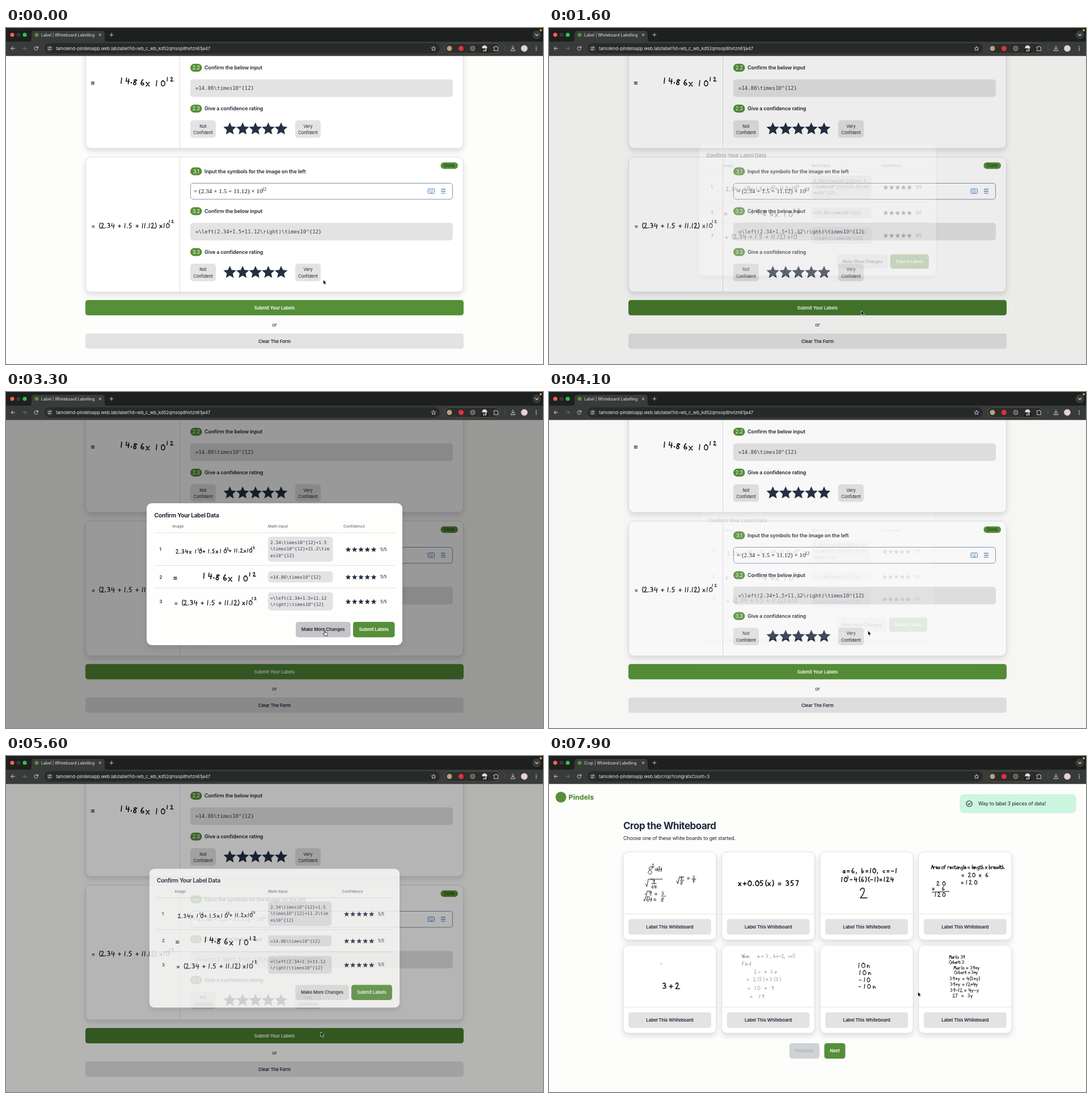
These frames come from a looping animation (947 px wide and 592 px high, 8000 ms). An HTML page:

```html
<!DOCTYPE html>
<html lang="en">
<head>
<meta charset="utf-8">
<title>Whiteboard labelling</title>
<style>
html, body { margin: 0; width: 100%; height: 100%; overflow: hidden; background: #fdfdfb; }
svg { display: block; width: 947px; height: 592px; font-family: Inter, sans-serif; }
text { letter-spacing: -.013em; }
.mono { font-family: "DejaVu Sans Mono", monospace; letter-spacing: 0; }
.math { font-family: "Liberation Serif", serif; letter-spacing: 0; }
.flat { letter-spacing: 0; }
.tight { letter-spacing: -.025em; }
.card { filter: drop-shadow(0 5px 5px rgba(40, 40, 80, .14)); }
.line { fill: none; stroke-linecap: round; stroke-linejoin: round; }
</style>
</head>
<body>
<svg id="stage" viewBox="0 0 947 592" xmlns="http://www.w3.org/2000/svg"></svg>
<script>
const DARK = '#1f2937', GREEN = '#558f38', GREEN_HOVER = '#467a2c', GREY = '#e3e3e4', GREY_HOVER = '#c5c5c8';
const LOOP = 8000, PAGE_SWITCH = 7450;

// ---- drawing helpers ----
const text = (s, x, y, size, { fill = DARK, weight = 400, anchor = 'start', cls = '' } = {}) =>
  `<text x="${x}" y="${y}" font-size="${size}" fill="${fill}" font-weight="${weight}" text-anchor="${anchor}" class="${cls}">${s}</text>`;
const box = (x, y, w, h, r, fill, extra = '') =>
  `<rect x="${x}" y="${y}" width="${w}" height="${h}" rx="${r}" fill="${fill}" ${extra}/>`;
const dot = (x, y, r, fill, extra = '') => `<circle cx="${x}" cy="${y}" r="${r}" fill="${fill}" ${extra}/>`;
const line = (d, color, width = 1, extra = '') =>
  `<path class="line" d="${d}" stroke="${color}" stroke-width="${width}" ${extra}/>`;
const button = (s, x, y, w, h, fill, color, id = '') =>
  box(x, y, w, h, 4.5, fill, id && `id="${id}"`) +
  text(s, x + w / 2, y + h / 2 + 2.8, 7.89, { fill: color, weight: 600, anchor: 'middle' });
const card = (x, y, w, h) => box(x, y, w, h, 9, '#fff', 'class="card" stroke="#dcdde8"');

function star(x, y, R, fill = '#253043') {
  const pts = Array.from({ length: 10 }, (_, i) => {
    const a = i * Math.PI / 5, r = i % 2 ? R * .46 : R;
    return `${(x + r * Math.sin(a)).toFixed(2)},${(y - r * Math.cos(a)).toFixed(2)}`;
  });
  return `<polygon points="${pts.join(' ')}" fill="${fill}"/>`;
}
const stars = (x, y, step, R) => [0, 1, 2, 3, 4].map(i => star(x + i * step, y, R)).join('');

// ---- handwriting: pen strokes in a 6 x 10 cell ----
const digits = {
  0: 'M4 0C-1 1-1 10 3 10S9 2 3 1', 1: 'M1 0L0 10', 2: 'M0 2C1-1 5-1 4 3Q3 7 0 10H7',
  3: 'M0 1C4-2 6 3 2 5C7 4 6 11 0 9', 4: 'M1 0L0 6H6M5 2L4 11', 5: 'M5 0H1L0 4C6 3 6 10 0 10',
  6: 'M4 0C0 3-1 10 3 10S6 5 1 6', 7: 'M0 0H5L2 10', 8: 'M6 1C0-2 0 4 3 5S4 11 1 9 1 5 6 1',
  9: 'M5 1C0-1 0 5 2 5S5 3 5 1L4 10'
};
const marks = {
  '+': 'M0 6H6M3 3V9', '=': 'M0 5H5M0 8H5', '-': 'M0 6H5', '(': 'M3-1Q-1 5 3 11', ')': 'M0-1Q4 5 0 11',
  '.': 'M1 9v1', ',': 'M1 9L0 12', ':': 'M1 5v.5M1 9v.5', '√': 'M0 6L2 10 4 0H11'
};
const letters = {
  a: 'M5 5C0 3 0 10 2 10Q5 9 5 5V10', b: 'M1 0V10C7 10 5 3 1 6', c: 'M5 5C0 4 0 10 5 9',
  d: 'M5 5C0 4 0 10 5 9V0', e: 'M1 7H5C4 3 0 4 1 8Q2 11 5 9', f: 'M5 1Q2-1 2 10M0 4H4',
  g: 'M5 5C0 3 0 10 5 8V11Q3 14 1 12', h: 'M1 0V10Q3 2 5 10', i: 'M2 4V10M2 1v.5', l: 'M2 0V10',
  n: 'M0 4V10Q3 0 5 10', o: 'M3 4C-1 4 0 10 3 10S6 4 3 4', r: 'M1 4V10M1 6Q3 3 5 5',
  s: 'M5 4C-2 5 8 8 0 10', t: 'M2 1V9Q3 11 5 9M0 4H5', x: 'M0 4L5 10M5 4L0 10', y: 'M0 4L2 9M5 4L1 13',
  A: 'M0 10L3 0 6 10M1 6H5', F: 'M5 0H0V10M0 5H4', W: 'M0 0L2 10 3 3 5 10 6 0', M: 'M0 10L1 0 3 6 5 0 6 10'
};
const glyphs = { ...digits, ...marks, ...letters, O: digits[0] };
const advance = c => '.,1():il'.includes(c) ? 4.5 : c === ' ' ? 5 : 8;

// Writes s from x to right, with its top at y and height h.
function ink(s, x, right, y, h, pen = 1, color = '#111') {
  const k = h / 10, chars = [...s];
  const total = chars.slice(0, -1).reduce((n, c) => n + advance(c), 0) || 1;
  const step = (right - x - 5.5 * k) / total;
  let at = x;
  return chars.map(c => {
    const out = glyphs[c] ? `<path class="line" transform="translate(${at.toFixed(2)} ${y}) scale(${k})" d="${glyphs[c]}" stroke="${color}" stroke-width="${pen / k}"/>` : '';
    at += advance(c) * step;
    return out;
  }).join('');
}

const productInk = ink('=', 150.5, 159, 90.5, 10, 1.5) + ink('14', 203, 217, 88, 9.5, 1.6) + ink('.', 220, 222, 87, 10, 2) +
  ink('86', 225, 243, 91, 9.5, 1.7) + ink('x', 247, 257, 91, 11.5, 1.5) +
  ink('10', 265, 279, 92.5, 9.5, 1.5) + ink('12', 284, 294, 87, 6.5, 1.4);
const sumInk = ink('=', 152, 158, 345, 7.5, 1.2) + ink('(2.34 + 1.5 + 11.12)', 164, 268, 344, 8.3, 1.2) +
  ink('x10', 271, 287, 344, 8, 1.2) + ink('12', 288, 295, 338.5, 4.5, 1.1);
const termsInk = ink('2.34x', 300, 327, 277.5, 6.8, 1.1) + ink('10', 334, 344, 277.5, 6.5, 1.1) +
  ink('12', 339, 345, 275, 3.8, 1) + ink('+ 1.5x', 347, 374, 277, 6.8, 1.1) + ink('10', 378, 388, 277, 6.5, 1.1) +
  ink('12', 387, 392, 274, 3.8, 1) + ink('+ 11.2x10', 393, 433, 276, 6.5, 1.1) + ink('12', 433, 438, 272.5, 3.5, 1);

// ---- browser frame ----
function browser() {
  const pale = '#d5d7d6';
  const ring = (x, y) => dot(x, y, 1.1, 'none', `stroke="${pale}" stroke-width=".8"`);
  return box(0, 0, 947, 25, 0, '#1e1f1f') + box(0, 24, 947, 25.3, 0, '#393a3a') +
    dot(11, 12, 3.6, '#fe5f57') + dot(22, 12, 3.6, '#383939') + dot(33, 12, 3.6, '#28c840') +
    `<path d="M41 24Q45 24 45 20V10Q45 5 50 5H169Q174 5 174 10V20Q174 24 178 24Z" fill="#393a3a"/>` +
    dot(54, 12, 3.5, GREEN) + `<text id="tab" x="62" y="14.6" font-size="7" fill="#e6e8e7" class="flat"></text>` +
    line('M164 10L168 14M168 10L164 14', pale, .9) + line('M183 12H189M186 9V15', pale, .9) +
    dot(936, 12, 7.5, '#3a3b3b') + line('M933.5 11L936 13.5 938.5 11', pale, 1.1) + dot(943, 4, 2, '#f09a37') +
    line('M15.5 36H9M12 33L9 36 12 39', pale) + line('M29.5 36H36M33 33L36 36 33 39', '#757777') +
    line('M56 34.5A3.2 3.2 0 1 0 56.2 37M56.5 32.5V35H54', pale) +
    box(68, 27, 697, 18, 9, '#282929') + dot(77, 36, 6, '#393a3a') +
    line('M74 34.2H76.5M79.5 34.2H80M74 37.8H74.5M77.5 37.8H80', pale, .9) + ring(78, 34.2) + ring(76, 37.8) +
    `<text id="url" x="88" y="39" font-size="7.9" fill="#e6e8e7"></text>` +
    `<g stroke="${pale}" stroke-width=".9">${star(754, 36.4, 4, 'none')}</g>` +
    box(774, 27, 97, 18, 9, '#2c2d2b', 'stroke="#55564a"') + dot(782, 36, 4.5, '#b8a27d') + dot(802.5, 36, 4.5, '#e2303c') +
    dot(823, 36, 4, '#565858', 'stroke="#a3a5a5" stroke-width=".9"') + dot(844, 35, 4.5, '#d8dadb') +
    box(839, 36, 11, 7, 1.5, '#111') + text('off', 844.5, 41.7, 5.8, { fill: '#fff', weight: 600, anchor: 'middle' }) +
    line('M860.5 33.5H862.5A1.5 1.5 0 0 1 865.5 33.5H867.5V40H860.5V38A1.4 1.4 0 0 0 860.5 35.5Z', pale) +
    line('M880 32V40', '#555756') + line('M894 31.5V37M891.5 35L894 37.5 896.5 35M890.5 38V40H897.5V38', pale) +
    dot(914, 36, 5.8, '#e3d3d2') + dot(935, 32.8, .9, pale) + dot(935, 36, .9, pale) + dot(935, 39.2, .9, pale);
}

// ---- label page ----
const heading = (num, s, y) => box(325, y - 7, 20.5, 14, 7, GREEN) +
  text(num, 335.3, y + 3.2, 9, { fill: '#fff', anchor: 'middle' }) + text(s, 350, y + 3.3, 9.02, { weight: 600 });
const chip = (top, x, y) => box(x, y, 45, 31, 5, GREY) +
  [top, 'Confident'].map((s, i) => text(s, x + 22.5, y + 13.3 + i * 11.3, 7.6, { anchor: 'middle' })).join('');

const answer = (n, code, dy) => `<g transform="translate(0 ${dy})">` +
  heading(n + '.2', 'Confirm the below input', 70) + box(325, 90.5, 463, 31, 5, GREY) +
  text(code, 334, 109, 9.02, { cls: 'mono', fill: '#303b4b' }) +
  heading(n + '.3', 'Give a confidence rating', 142) + chip('Not', 325, 162.5) + chip('Very', 510, 162.5) +
  stars(394.7, 178, 22.6, 11.8) + '</g>';

function labelPage() {
  const blue = '#3c73b9';
  return card(140.5, 20, 666, 192) + line('M306.5 50V212', '#dcdde6') + productInk +
    answer(2, String.raw`=14.86\times10^{12}`, 0) +
    card(140.5, 227.5, 666, 237.5) + line('M306.5 228V465', '#dcdde6') + sumInk +
    heading('3.1', 'Input the symbols for the image on the left', 252.6) +
    box(766.5, 236.7, 30.5, 11.5, 5.7, GREEN) + text('Done', 781.7, 245.2, 7.7, { anchor: 'middle', fill: '#1c3312' }) +
    box(325.5, 273.5, 462, 28.3, 4.5, '#fff', 'stroke="#8590b0"') +
    text('= (2.34 + 1.5 + 11.12) × 10', 331, 291, 11.2, { cls: 'math', fill: '#111' }) +
    text('12', 451.3, 287, 7.7, { cls: 'math', fill: '#111' }) +
    box(744, 283.5, 11.5, 8, 1, 'none', `stroke="${blue}" stroke-width=".9"`) +
    line('M746 285.8H753.5M746 287.6H753.5', blue, .8, 'stroke-dasharray=".4 1.7"') +
    line('M748 289.6H752', blue, .8) + line('M767.5 284.2H774.5M767.5 287.6H774.5M767.5 291H774.5', blue, 1.2) +
    answer(3, String.raw`=\left(2.34+1.5+11.12\right)\times10^{12}`, 252.7) +
    button('Submit Your Labels', 140, 479.3, 667, 27, GREEN, '#fff', 'send') +
    text('or', 473.5, 525.5, 9.02, { anchor: 'middle' }) +
    button('Clear The Form', 140, 538.3, 667, 27, GREY, DARK);
}

// ---- confirmation dialog ----
function dialog() {
  const rows = [
    { y: 277.2, top: 255, h: 44, code: [String.raw`2.34\times10^{12}+1.5`, String.raw`\times10^{12}+11.2\tim`, 'es10^{12}'], art: termsInk },
    { y: 325.8, top: 316, h: 19.5, code: [String.raw`=14.86\times10^{12}`], art: `<g transform="translate(145.5 231)">${productInk}</g>` },
    { y: 369, top: 353, h: 32, code: [String.raw`=\left(2.34+1.5+11.12`, String.raw`\right)\times10^{12}`], art: `<g transform="translate(146 23)">${sumInk}</g>` }
  ];
  const head = (s, x) => text(s, x, 239.2, 6.76, { weight: 600, fill: '#7a808b', cls: 'flat' });
  return box(248, 196, 451, 250, 9, '#fefefd', 'class="card"') +
    text('Confirm Your Label Data', 261.5, 221, 10.15, { weight: 700, cls: 'tight' }) +
    head('Image', 293.5) + head('Math Input', 462) + head('Confidence', 595) +
    [248, 305.5, 345.5].map(y => line(`M261.5 ${y}H686`, '#e2e2e6')).join('') +
    rows.map((r, i) => text(i + 1, 270.5, r.y + 2.7, 7.89, { weight: 600 }) + r.art +
      box(462, r.top, 114.5, r.h, 5, GREY) +
      r.code.map((s, n) => text(s, 466, r.top + 12.7 + n * 11.6, 7.89, { cls: 'mono', fill: '#374151' })).join('') +
      stars(603.5, r.y + .6, 11.25, 5) + text('5/5', 660, r.y + 2.6, 7.6)).join('') +
    button('Make More Changes', 511, 405, 96.5, 27.3, GREY, DARK, 'change') +
    button('Submit Labels', 612, 405, 73.5, 27.3, GREEN, '#fff', 'confirm');
}

// ---- crop page ----
function boards() {
  const soft = (s, x, r, y) => ink(s, x, r, y, 6.5, .7, '#85838f');
  const small = (s, x, r, y, h = 6) => ink(s, x, r, y, h, .9);
  return small('8', 175, 185, 195, 14) + small('2', 182, 186, 190, 5) + small('=64', 187, 199, 195, 8) +
    small('√', 170, 180, 217, 13) + line('M179 217H200M181 224.5H189', '#111', .9) + small('9', 183, 187, 218) + small('64', 181, 189, 227) +
    small('√', 225, 235, 213, 12) + small('9', 232, 236, 213, 5) + line('M231 219H238M252 217H259', '#111', .9) +
    small('8', 232, 236, 221, 6) + small('=', 244, 249, 211, 7) + small('3', 254, 258, 211, 5) + small('8', 254, 258, 218, 5) +
    small('√9 =', 170, 191, 238, 8) + small('3', 199, 205, 239) + line('M198 247H206', '#111', .8) +
    small('√64 =', 167, 189, 248, 8) + small('8', 198, 203, 250, 7) +
    ink('x+0.05(x) = 357', 334, 440, 219.5, 9, 1.6) +
    ink('a=6, b=10, c=-1', 518, 616, 198, 8, 1.4) + ink('10', 516, 525, 213.5, 8, 1.4) + ink('2', 526, 530, 211, 4, 1) +
    ink('-4(6)(-1)=124', 531, 607, 213.5, 7.5, 1.4) + ink('2', 549, 561, 233, 17, 1.5) +
    ink('Area of rectangle = length x breadth', 674, 803, 192, 7, 1.1) + ink('= 20 x 6', 728, 774, 206, 7, 1.1) +
    ink('=120', 727, 754, 219, 7, 1.1) + ink('20', 684, 698, 221, 7, 1.1) + ink('x  6', 676, 697, 230, 6.5, 1.1) +
    line('M675.5 240L705.5 238.5', '#111') + ink('120', 681, 698, 240.5, 7, 1.1) +
    dot(198, 366, .8, '#333') + ink('3+2', 201, 229, 400, 10, 1.6) +
    soft('When', 340, 354, 349) + soft('a = 3 , b=-2, c=5', 367, 434, 349) + soft('Find', 341, 356, 362.5) +
    soft('2c + 3a', 362, 401, 376.5) + soft('= 2(5)+3(3)', 349, 411, 390) + soft('= 10 + 9', 351, 396, 405.5) + soft('=  19', 355, 379, 420) +
    ink('10n', 546, 566, 364.5, 8.5, 1.1) + ink('10n', 548, 568, 377.5, 8, 1.1) + ink('-10', 547, 565, 390.5, 7.5, 1.1) + ink('-10n', 546, 576, 402, 7.5, 1.1) +
    small('Marlo: 39', 706, 733, 351) + small('Osbert: 3', 706, 732, 360) + small('Marlo = 39+y', 714, 759, 370) +
    small('Osbert = 3+y', 715, 756, 378) + small('39+y = 4(3+y)', 707, 762, 389) + small('39+y = 12+4y', 708, 756, 399) +
    small('39-12 = 4y-y', 708, 758, 409.5) + small('27  =  3y', 712, 747, 419);
}

function cropPage() {
  let cards = '';
  for (let i = 0; i < 8; i++) {
    const x = 131 + (i % 4) * 173.6, y = 169 + Math.floor(i / 4) * 164.3;
    cards += card(x, y, 164, 155) + line(`M${x} ${y + 109.3}h164`, '#e4e5e2') +
      button('Label This Whiteboard', x + 9, y + 118.3, 146, 27.5, GREY, DARK);
  }
  return dot(21, 72.5, 9.5, GREEN) + text('Pindels', 34.5, 77, 12.2, { weight: 800, fill: GREEN, cls: 'flat' }) +
    box(725, 68, 204, 32, 6, '#cdf6de', 'stroke="#bdebd0" stroke-width=".7"') +
    dot(741, 84, 5, 'none', `stroke="${DARK}" stroke-width="1.1"`) + line('M738.8 84.2L740.4 85.8 743.3 82.6', DARK, 1.1) +
    text('Way to label 3 pieces of data!', 757, 87.2, 9.02, { cls: 'tight' }) +
    text('Crop the Whiteboard', 131, 129, 16.9, { weight: 700, cls: 'tight' }) +
    text('Choose one of these white boards to get started.', 131, 147.5, 9.02, { cls: 'tight' }) +
    cards + boards() +
    button('Previous', 424, 506, 53, 27.3, '#d0d3d6', '#adb1b6') + button('Next', 485.5, 506, 37, 27.3, GREEN, '#fff');
}

// ---- scene ----
const stage = document.getElementById('stage');
stage.innerHTML = box(0, 0, 947, 592, 0, '#fdfdfb') +
  `<g id="label">${labelPage()}</g>
   <g id="modal">${box(0, 49, 947, 543, 0, '#000', 'id="shade"')}<g id="panel">${dialog()}</g></g>
   <g id="crop">${cropPage()}</g>` + browser() +
  `<g id="cursor" stroke-linejoin="round">
     <path id="arrow" d="M0 0V8.3L1.9 6.6 3.2 9.5 4.6 8.9 3.3 6H6Z" fill="#000" stroke="#fff" stroke-width=".7"/>
     <path id="hand" d="M-.8 .6Q0-.6 .8 .6V3.4L4 4.2Q5 4.6 4.8 6L4.2 9H-.6L-3 5.8Q-3 4.4-1.8 5L-.8 6Z" fill="#fff" stroke="#000" stroke-width=".8"/>
   </g>`;
const el = Object.fromEntries([...stage.querySelectorAll('[id]')].map(e => [e.id, e]));

// ---- motion ----
const clamp = v => Math.min(1, Math.max(0, v));
const easeOut = u => 1 - (1 - clamp(u)) ** 3;
const smooth = u => u * u * (3 - 2 * u);
const within = (t, a, b) => t >= a && t < b;

const track = [
  [0, 559.5, 443.5], [500, 559.5, 443.5], [900, 556, 468], [1300, 550.5, 498], [2800, 550.5, 498], [3250, 562.5, 420.5],
  [4600, 562.5, 420.5], [4900, 555, 482], [5200, 555, 486], [6300, 555, 486], [6490, 650.5, 415.5], [LOOP, 650.5, 415.5]
];
function pointer(t) {
  const i = Math.max(1, track.findIndex(k => k[0] > t));
  const [t0, x0, y0] = track[i - 1], [t1, x1, y1] = track[i];
  const u = smooth((t - t0) / (t1 - t0));
  return [x0 + (x1 - x0) * u, y0 + (y1 - y0) * u];
}

function mix(a, b, u) {
  const part = (c, i) => parseInt(c.slice(i, i + 2), 16);
  return `rgb(${[1, 3, 5].map(i => Math.round(part(a, i) + (part(b, i) - part(a, i)) * u))})`;
}
const hover = (t, from, to) => easeOut((t - from) / 200) * (1 - easeOut((t - to) / 200));
const show = (e, on) => e.setAttribute('display', on ? 'inline' : 'none');

function render(t) {
  const cropping = t >= PAGE_SWITCH;
  const open = t < 4000 ? easeOut((t - 1582) / 200) : t < 5000 ? 1 - easeOut((t - 4000) / 200) : easeOut((t - 5521) / 200);
  show(el.label, !cropping);
  show(el.crop, cropping);
  show(el.modal, !cropping && open > 0);
  el.shade.setAttribute('opacity', .4 * open ** 1.3);
  el.panel.setAttribute('opacity', open);
  el.panel.setAttribute('transform', `translate(473.5 321) scale(${.9 + .1 * open}) translate(-473.5 -321)`);
  el.tab.textContent = (cropping ? 'Crop' : 'Label') + ' | Whiteboard Labelling';
  el.url.textContent = 'tamolend-pindelsapp.web.lab/' + (cropping ? 'crop?congratsCount=3' : 'label?id=wb_c_wb_kd52qmsop8hvtzn61ja47');

  const sending = Math.max(hover(t, 1100, 1620), hover(t, 4870, 5620));
  el.send.setAttribute('fill', mix(GREEN, GREEN_HOVER, sending));
  el.change.setAttribute('fill', mix(GREY, GREY_HOVER, hover(t, 3080, 4000)));
  el.confirm.setAttribute('fill', mix(GREEN, GREEN_HOVER, hover(t, 6400, LOOP)));

  const [x, y] = pointer(t);
  el.cursor.setAttribute('transform', `translate(${x} ${y})`);
  const pointing = within(t, 1100, 1582) || within(t, 3150, 4050) || within(t, 4870, 5521) || within(t, 6430, PAGE_SWITCH);
  show(el.hand, pointing);
  show(el.arrow, !pointing);
}

function tick() {
  render(performance.now() % LOOP);
  requestAnimationFrame(tick);
}
tick();
</script>
</body>
</html>
```
